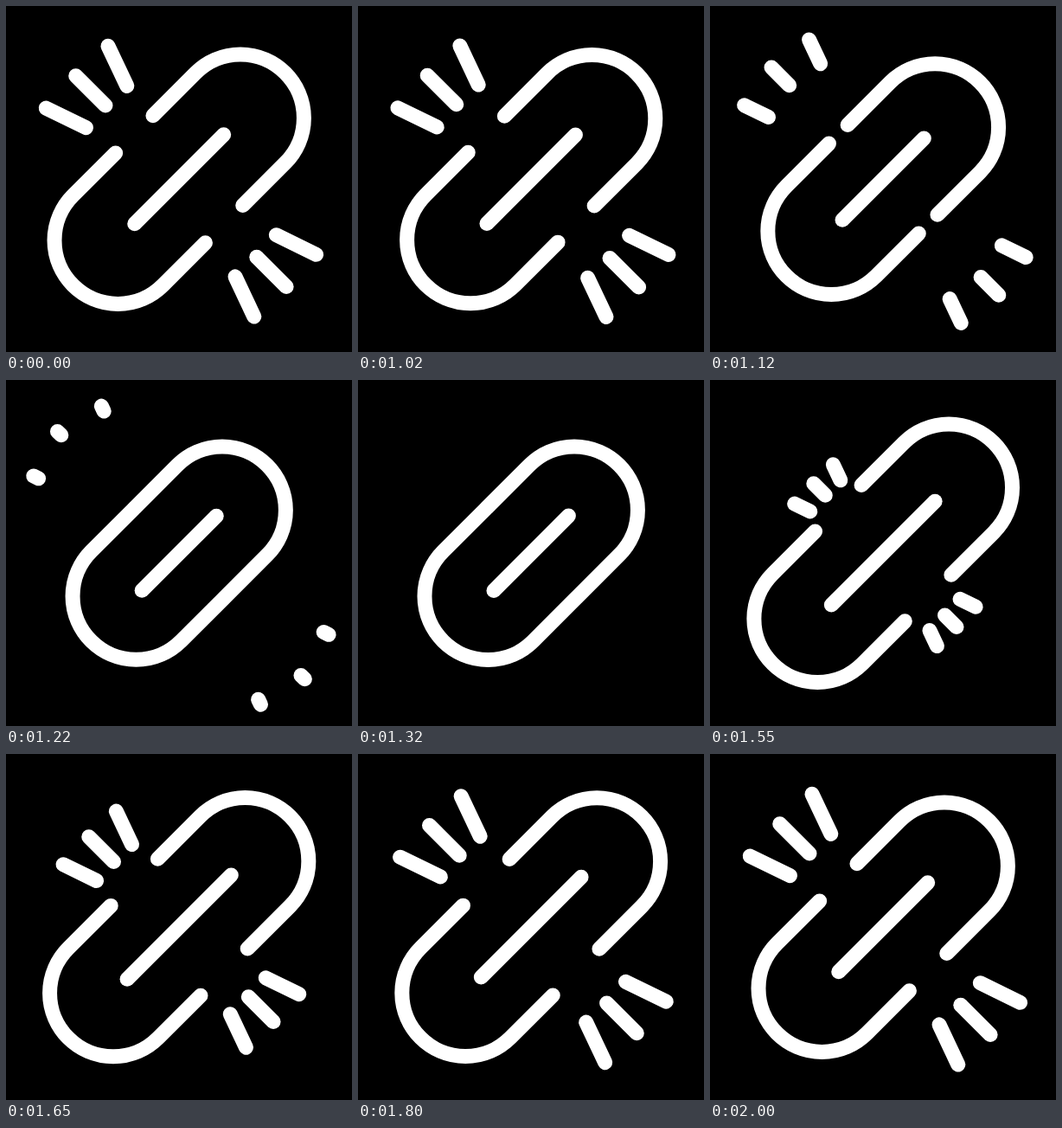
An HTML page with a canvas for the animation above (2020 ms loop, 400 px wide and 400 px high).

```html
<!DOCTYPE html>
<html lang="en">
<head>
<meta charset="utf-8">
<title>Unlink icon</title>
<style>
  html, body { margin: 0; width: 100%; height: 100%; overflow: hidden; background: #000; }
  canvas { display: block; width: 400px; height: 400px; }
</style>
</head>
<body>
<canvas width="400" height="400"></canvas>
<script>
const ctx = document.querySelector('canvas').getContext('2d');
const LOOP = 2020, HOLD = 1020, STEP = 25;
const RADIUS = 73.4, ARM = 69.5;

// Inner end, outward angle, resting length and farthest reach of each ray
const rays = [
  { x: 92.5, y: 140.6, angle: 206, length: 51.5, reach: 70 },
  { x: 115, y: 115, angle: 225, length: 48.5, reach: 83 },
  { x: 139.8, y: 92.4, angle: 244.7, length: 51, reach: 71.5 },
];
const RAY_ROOT = -34;

const clamp = x => Math.min(1, Math.max(0, x));
const mix = (a, b, p) => a + (b - a) * p;
const smooth = (t, from, to) => {
  const x = clamp((t - from) / (to - from));
  return x * x * (3 - 2 * x);
};
const easeOut = (t, from, to, power) => 1 - (1 - clamp((t - from) / (to - from))) ** power;

// Eased value through [time, value] keys
function track(t, keys) {
  let value = keys[0][1];
  for (let i = 1; i < keys.length; i++) {
    value += (keys[i][1] - keys[i - 1][1]) * smooth(t, keys[i - 1][0], keys[i][0]);
  }
  return value;
}

function placed(x, y, degrees, draw) {
  ctx.save();
  ctx.translate(x, y);
  ctx.rotate(degrees * Math.PI / 180);
  draw();
  ctx.restore();
}

function line(from, to) {
  ctx.beginPath();
  ctx.moveTo(from, 0);
  ctx.lineTo(to, 0);
  ctx.stroke();
}

function drawHalf(gap) {
  ctx.beginPath();
  ctx.moveTo(gap, -RADIUS);
  ctx.arc(gap + ARM, 0, RADIUS, -Math.PI / 2, Math.PI / 2);
  ctx.lineTo(gap, RADIUS);
  ctx.stroke();
}

function drawLink(t) {
  const gap = track(t, [[0, 30.6], [250, 0], [300, 0], [567, 38.3], [770, 38.3], [1000, 30.6]]);
  const bar = track(t, [[0, 72.8], [250, 60.5], [300, 60.5], [567, 85], [700, 85], [1000, 72.8]]);
  placed(200.2, 200.2, -45, () => {
    drawHalf(gap);
    placed(0, 0, 180, () => drawHalf(gap));
    line(-bar, bar);
  });
}

// Rays fly off outward, then shoot out again from the link
function drawRay({ x, y, angle, length, reach }, t) {
  let from, to;
  if (t < 400) {
    const p = smooth(t, 0, 290);
    from = mix(0, reach, p);
    to = mix(length, reach, p);
  } else {
    from = mix(RAY_ROOT, 0, easeOut(t, 500, 1000, 2.6));
    to = mix(RAY_ROOT, length, easeOut(t, 500, 1000, 3.8));
  }
  if (to - from > 0.01) placed(x, y, angle, () => line(from, to));
}

function drawRays(t) {
  rays.forEach(ray => drawRay(ray, t));
}

function frame(now) {
  const time = now % LOOP;
  const t = time < HOLD ? 0 : STEP * (1 + Math.floor((time - HOLD) / STEP));
  ctx.fillStyle = '#000';
  ctx.fillRect(0, 0, 400, 400);
  ctx.strokeStyle = '#fff';
  ctx.lineWidth = 17;
  ctx.lineCap = 'round';
  drawLink(t);
  drawRays(t);
  placed(404.8, 405.3, 180, () => drawRays(t));
  requestAnimationFrame(frame);
}
requestAnimationFrame(frame);
</script>
</body>
</html>
```
